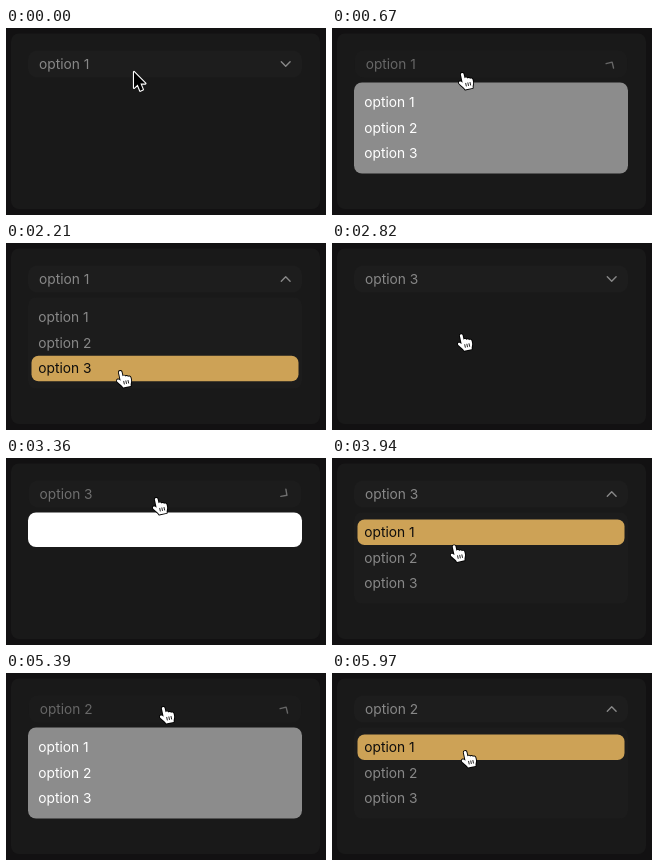
An HTML page with a canvas that plays this animation: 320 px wide and 187 px high, repeating every 6 s.

```html
<!DOCTYPE html>
<html lang="en">
<head>
<meta charset="utf-8">
<title>Dropdown</title>
<style>
  html, body { margin: 0; width: 100%; height: 100%; overflow: hidden; background: #121112; }
  canvas { display: block; width: 100vw; height: 100vh; }
</style>
</head>
<body>
<canvas id="stage"></canvas>
<script>
const W = 320, H = 187, LOOP = 6000;
const canvas = document.getElementById('stage');
const ctx = canvas.getContext('2d');
const dpr = window.devicePixelRatio || 1;
canvas.width = W * dpr;
canvas.height = H * dpr;

const FONT = '13.75px Inter, sans-serif';
const PANEL = { x: 22, y: 54.5, w: 274, h: 91, r: 8 };
const ROW = { top: 61.5, h: 25.6 };
const GRAY = [136, 136, 136], GOLD = [205, 162, 86], INK = [14, 13, 12], SURFACE = [28, 28, 28];

// Each click toggles the menu; a closing click sets the chosen option.
const clicks = [
  { t: 450, open: true },
  { t: 2300, open: false, pick: 3 },
  { t: 3250, open: true },
  { t: 4200, open: false, pick: 2 },
  { t: 5170, open: true }
];

// Cursor stops: time, x, y of the fingertip.
const path = [
  [0, 128, 44], [30, 128, 44], [180, 131, 43],
  [450, 131, 43], [600, 130, 45],
  [1060, 130, 45], [1900, 114, 128],
  [2500, 114, 128], [3220, 150, 40],
  [3600, 150, 40], [4110, 112, 104],
  [4260, 112, 104], [5060, 157, 34],
  [5480, 157, 34], [6050, 131.5, 80.5]
];

const clamp = v => Math.max(0, Math.min(1, v));
const ease = v => { v = clamp(v); return v * v * (3 - 2 * v); };
const mix = (a, b, k) => a + (b - a) * k;
const mixColor = (a, b, k) => a.map((v, i) => mix(v, b[i], k));
const rgb = (c, gain = 1) => `rgb(${c.map(v => Math.min(255, Math.round(v * gain))).join()})`;

function cursorAt(t) {
  let i = 0;
  while (i < path.length - 2 && path[i + 1][0] <= t) i++;
  const [a, b] = [path[i], path[i + 1]];
  const k = ease((t - a[0]) / (b[0] - a[0]));
  return { x: mix(a[1], b[1], k), y: mix(a[2], b[2], k) };
}

function menuAt(t) {
  const state = { open: false, age: Infinity, picked: 1 };
  for (const c of clicks) {
    if (c.t > t) break;
    state.open = c.open;
    state.age = t - c.t;
    if (c.pick) state.picked = c.pick;
  }
  return state;
}

// Share of the last moments spent over a row, giving a short fade.
function hoverAmount(row, t) {
  let n = 0;
  for (let k = 0; k < 6; k++) {
    const { y } = cursorAt(Math.max(0, t - k * 15));
    if (Math.floor((y - 2 - ROW.top) / ROW.h) === row) n++;
  }
  return n / 6;
}

function box(x, y, w, h, r, fill) {
  ctx.beginPath();
  ctx.roundRect(x, y, w, h, Math.min(r, h / 2));
  ctx.fillStyle = fill;
  ctx.fill();
}

function label(text, x, baseline, fill) {
  ctx.font = FONT;
  ctx.fillStyle = fill;
  ctx.fillText(text, x, baseline);
}

function drawChevron(angle) {
  ctx.save();
  ctx.translate(279.7, 36);
  ctx.rotate(-angle);
  ctx.beginPath();
  ctx.moveTo(-4.4, -2.2);
  ctx.lineTo(0, 2.2);
  ctx.lineTo(4.4, -2.2);
  ctx.strokeStyle = rgb(GRAY);
  ctx.lineWidth = 1.4;
  ctx.lineCap = ctx.lineJoin = 'round';
  ctx.stroke();
  ctx.restore();
}

function drawButton(menu) {
  const press = menu.open && menu.age < 400 ? Math.sin(Math.PI * menu.age / 400) : 0;
  const turn = ease(menu.age / 300);
  ctx.save();
  ctx.translate(159, 36);
  ctx.scale(1 - 0.006 * press, 1 - 0.006 * press);
  ctx.translate(-159, -36);
  ctx.globalAlpha = 1 - 0.3 * press;
  box(22, 22.5, 274, 27, 9, '#1d1d1d');
  label('option ' + menu.picked, 33, 41, rgb(GRAY));
  drawChevron(Math.PI * (menu.open ? turn : 1 - turn));
  ctx.restore();
}

function drawPanel(menu, t) {
  const grow = Math.pow(clamp(menu.age / 210), 1.5);
  const h = PANEL.h * (menu.open ? grow : 1 - grow);
  if (h < 0.5) return;
  // The panel flashes bright on opening and settles to its normal tone.
  const gain = menu.open ? mix(15, 1, ease(menu.age / 340)) : 1;
  ctx.save();
  box(PANEL.x, PANEL.y, PANEL.w, h, PANEL.r, rgb(SURFACE, gain));
  ctx.clip();
  for (let i = 0; i < 3; i++) {
    const y = ROW.top + i * ROW.h;
    const k = hoverAmount(i, t);
    if (k) {
      ctx.globalAlpha = k;
      box(25.5, y, 267, 25.6, 7, rgb(GOLD, gain));
      ctx.globalAlpha = 1;
    }
    label('option ' + (i + 1), 32.3, y + 17.6, rgb(mixColor(GRAY, INK, k), gain));
  }
  ctx.restore();
}

const arrow = new Path2D('M0 0V16L3.7 12.6L6.2 18.8L8.9 17.6L6.4 11.6H11.4Z');
const hand = new Path2D('M-1.4 1.2C-1.4 -.4 1.4 -.4 1.4 1.2V6C1.6 5 4 5 4.1 6.6' +
  'C4.6 5.8 6.6 6 6.7 7.4C7.4 6.8 9 7.2 9 8.8V11C9 13 7.6 14 7.4 16.8H-.4' +
  'C-.6 15 -3 13 -4.2 10.8C-6 8.6 -4.4 7 -2.8 8.2L-1.4 9.6Z');
const creases = new Path2D('M1.5 10.5V14M3.7 10.5V14M5.9 10.5V14');

function drawCursor(t) {
  const { x, y } = cursorAt(t);
  ctx.save();
  ctx.translate(x, y);
  ctx.lineJoin = 'round';
  if (t < 90) {
    ctx.strokeStyle = '#fff';
    ctx.lineWidth = 2.2;
    ctx.stroke(arrow);
    ctx.fillStyle = '#000';
    ctx.fill(arrow);
  } else {
    ctx.rotate(-0.21);
    ctx.strokeStyle = '#000';
    ctx.lineWidth = 1.8;
    ctx.stroke(hand);
    ctx.fillStyle = '#fff';
    ctx.fill(hand);
    ctx.lineWidth = 0.8;
    ctx.stroke(creases);
  }
  ctx.restore();
}

function draw(now) {
  const t = now % LOOP;
  const menu = menuAt(t);
  ctx.setTransform(dpr, 0, 0, dpr, 0, 0);
  ctx.fillStyle = '#121112';
  ctx.fillRect(0, 0, W, H);
  box(5, 5.5, 309, 175.5, 8, '#191919');
  drawButton(menu);
  drawPanel(menu, t);
  drawCursor(t);
}

let start;
function tick(now) {
  start ??= now;
  draw(now - start);
  requestAnimationFrame(tick);
}
draw(0);
requestAnimationFrame(tick);
</script>
</body>
</html>
```
